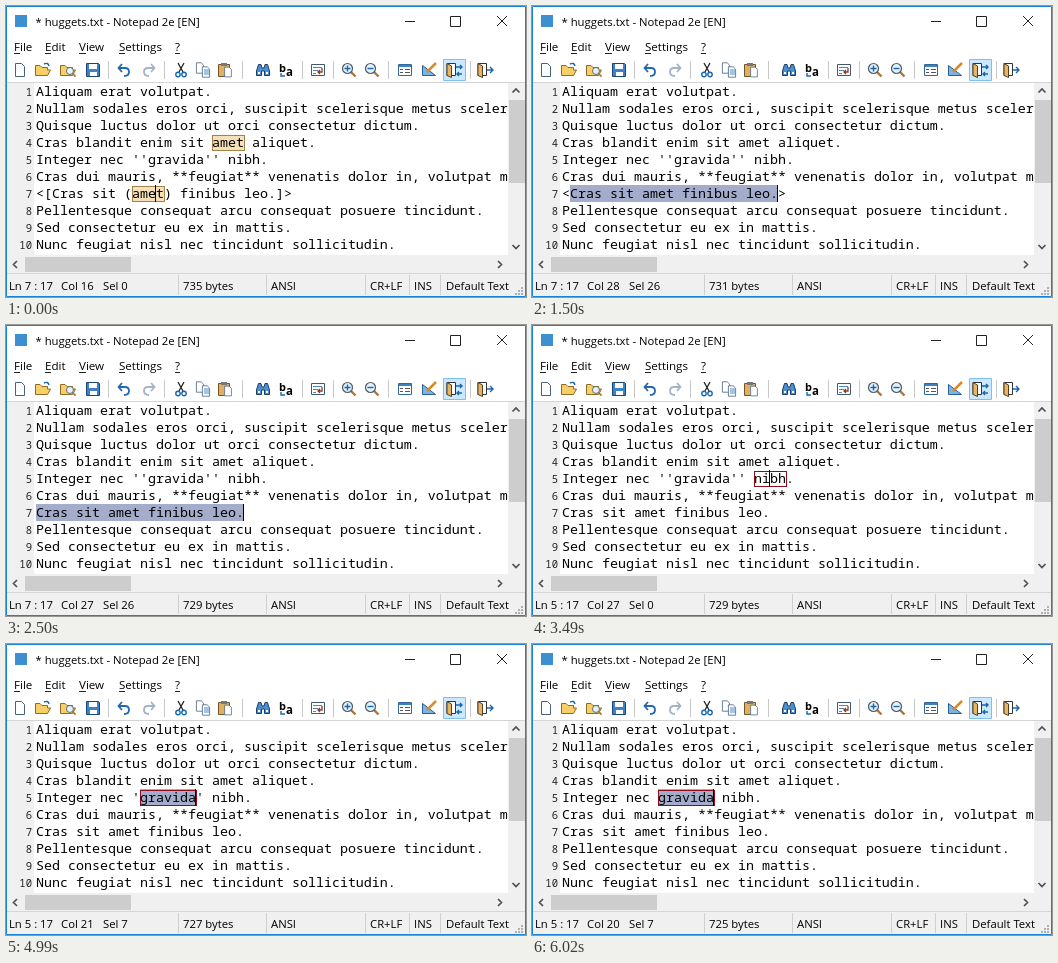
Recreate the animation shown at these times as an HTML page. Size 520 by 291 pixels, loop 8000 ms.

```html
<!DOCTYPE html>
<html lang="en">
<head>
<meta charset="utf-8">
<title>Text editor</title>
<style>
  html, body { margin: 0; width: 100%; height: 100%; overflow: hidden; }
  svg { display: block; width: 520px; height: 291px; }
  text { white-space: pre; }
  .ui { font: 11.6px "Open Sans", sans-serif; fill: #000; }
  .title, .status { font-size: 11.3px; }
  .code { font: 13.33px "Noto Sans Mono", monospace; fill: #000; }
  .num { font: 10.6px "Noto Sans Mono", monospace; fill: #222; text-anchor: end; }
  .line { fill: none; stroke: #222; }
  .blue { fill: none; stroke: #1766b0; stroke-width: 1.4; }
  #keys { font: 600 28px "Open Sans", sans-serif; letter-spacing: 1.6px; text-anchor: middle;
    fill: #63f263; stroke: #176b22; stroke-width: 3px; stroke-linejoin: round; paint-order: stroke; }
</style>
</head>
<body>
<svg viewBox="0 0 520 291">
  <defs>
    <clipPath id="page"><path d="M1 77H502V249H1z"/></clipPath>
    <g id="door">
      <path d="M-7 5.500V-6.500H1.500V5.500z" fill="#fff" stroke="#333"/>
      <path d="M-7-6.500L-2.500-4V7.500L-7 5.500z" fill="#e6b668" stroke="#54401f"/>
    </g>
    <g id="lens">
      <path d="M2 2L6.500 6.500" stroke="#a8773c" stroke-width="2.4"/>
      <circle cx="-1.500" cy="-1.500" r="5" fill="#e4f2fc" stroke="#4d5a66" stroke-width="1.2"/>
    </g>
    <path id="folder" d="M-7.500 5.500V-4.500H-3L-1-2.500H4.500V0H7.500L4.500 5.500z" fill="#f6cf68" stroke="#8f6a24"/>
    <path id="sheet" d="M-4.500-6.500H1.500L4.500-3.500V6.500H-4.500z" fill="#fff" stroke="#47617e"/>
    <g id="bend" fill="none" stroke-width="1.8">
      <path d="M-5-2H1Q5-2 5 2T0 6"/><path d="M-2-6L-5.500-2L-2 2"/>
    </g>
  </defs>

  <!-- window and title bar -->
  <path d="M0 0H520V291H0z" fill="#fff"/>
  <path d="M9 9H21V21H9z" fill="#3d8fd0"/>
  <text class="ui title" x="29.500" y="20">* huggets.txt - Notepad 2e [EN]</text>
  <path class="line" d="M399 15.500H409M444.500 10.500H454.500V20.500H444.500zM491 10L501 20M501 10L491 20"/>
  <g id="menu"></g>

  <!-- toolbar -->
  <path d="M437.500 53.500H459.500V74.500H437.500z" fill="#cce8ff" stroke="#7cc0f2"/>
  <path d="M102.500 55V73M158.500 55V73M236.500 55V73M296.500 55V73M327.500 55V73M382.500 55V73M464.500 55V73" stroke="#c8c8c8"/>
  <use href="#sheet" x="14" y="64"/>
  <g transform="translate(37 64)"><use href="#folder"/><path d="M1-6Q5-8 6-4" class="blue"/></g>
  <g transform="translate(62 64)">
    <use href="#folder"/><use href="#lens" transform="translate(3 2) scale(.7)"/>
  </g>
  <g transform="translate(87 64)">
    <path d="M-6.500-6.500H5.500L6.500-5.500V6.500H-6.500z" fill="#3b82c8" stroke="#1d4573"/>
    <path d="M-4-6H4V-1H-4zM-3 2H4V6H-3z" fill="#fff"/>
  </g>
  <use href="#bend" x="118" y="64" stroke="#2368b0"/>
  <use href="#bend" transform="translate(143 64) scale(-1 1)" stroke="#a3b4c4"/>
  <g transform="translate(175 64)" class="line">
    <path d="M-3-7L2 2M3-7L-2 2" stroke-width="1.3"/>
    <g class="blue"><circle cx="-3" cy="4.500" r="2.200"/><circle cx="3" cy="4.500" r="2.200"/></g>
  </g>
  <g transform="translate(197 64)">
    <use href="#sheet" transform="translate(-3 -2) scale(.8)"/>
    <use href="#sheet" transform="translate(3 2) scale(.8)"/>
    <path d="M1 0H6M1 2H6M1 4H6" stroke="#4a86c5"/>
  </g>
  <g transform="translate(219 64)">
    <path d="M-6.500-5.500H4.500V6.500H-6.500z" fill="#e0b062" stroke="#755326"/>
    <path d="M-4-7H2V-4H-4z" fill="#777"/>
    <use href="#sheet" transform="translate(3 2) scale(.75)"/>
  </g>
  <g transform="translate(257 64)" fill="#4b8fd0" stroke="#1c3d63">
    <path d="M-4.500-5.500H-2L-1-2H1L2-5.500H4.500L6.500 1V5.500H1.500V1H-1.500V5.500H-6.500V1z"/>
    <path d="M-5 2H-3V4H-5zM3 2H5V4H3z" fill="#fff" stroke="none"/>
  </g>
  <g transform="translate(280 64)">
    <text x="-7" y="2" font-family="Open Sans, sans-serif" font-size="11" font-weight="700">b</text>
    <text x="0" y="6" font-family="Open Sans, sans-serif" font-size="11.500" font-weight="700">a</text>
    <path d="M-5 3V6H-1" class="blue"/>
  </g>
  <g transform="translate(312 64)">
    <path d="M-6.500-5.500H6.500V5.500H-6.500z" fill="#fff" stroke="#425a70"/>
    <path d="M-5-2.500H4M-5 .5H0M-5 3.500H-2" stroke="#4a86c5"/>
    <path d="M4-2V2H0M2 0L0 2L2 4" fill="none" stroke="#8a3c20" stroke-width="1.3"/>
  </g>
  <g transform="translate(343 64)"><use href="#lens"/><path d="M-4.500-1.500H1.500M-1.500-4.500V1.500" class="blue"/></g>
  <g transform="translate(366 64)"><use href="#lens"/><path d="M-4.500-1.500H1.500" class="blue"/></g>
  <g transform="translate(399 64)">
    <path d="M-6.500-5.500H6.500V5.500H-6.500z" fill="#fff" stroke="#34679b"/>
    <path d="M-6-5H6V-3H-6z" fill="#3b82c4"/>
    <path d="M-5-.5H-2M0-.5H5M-5 2.500H-2M0 2.500H5" stroke="#555"/>
  </g>
  <g transform="translate(423 64)">
    <path d="M-6.500-4.500V5.500H6.500z" fill="#7db4e6" stroke="#2a5f96"/>
    <path d="M7-7L-2 2" stroke="#d88a24" stroke-width="2.500"/>
  </g>
  <g transform="translate(448 64)">
    <use href="#door"/>
    <path d="M2-3H8M6-5L8-3L6-1M8 4H3M5 2L3 4L5 6" class="blue"/>
  </g>
  <g transform="translate(479 64)">
    <use href="#door"/>
    <path d="M2 0H8M5-3L8 0L5 3" class="blue"/>
  </g>

  <!-- editor -->
  <path d="M1 76.500H519" stroke="#d4d4d4"/>
  <path d="M1 77H28V249H1z" fill="#f0f0f0"/>
  <g clip-path="url(#page)"><g id="marks"></g><g id="lines"></g><path id="caret" stroke="#000"/></g>

  <!-- scroll bars -->
  <path d="M502 77H519V267H502zM1 249H502V267H1z" fill="#f0f0f0"/>
  <path d="M503 94H519V177H503zM19 251H125V266H19z" fill="#cdcdcd"/>
  <path d="M506.500 86.500L510 83L513.500 86.500M506.500 239L510 242.500L513.500 239M11 255L7.500 258.500L11 262M492 255L495.500 258.500L492 262" fill="none" stroke="#505050" stroke-width="1.700"/>

  <!-- status bar -->
  <path d="M1 267H519V290H1z" fill="#f0f0f0"/>
  <path d="M1 267.500H519" stroke="#d5d5d5"/>
  <path d="M172.500 269V289M260.500 269V289M359.500 269V289M403.500 269V289M434.500 269V289" stroke="#d0d0d0"/>
  <path d="M515 281h2v2h-2zM515 284h2v2h-2zM515 287h2v2h-2zM512 284h2v2h-2zM512 287h2v2h-2zM509 287h2v2h-2z" fill="#b0b0b0"/>
  <g id="status"></g>
  <path d="M.5.5H519.500V290.500H.5z" fill="none" stroke="#1883d7"/>
  <text id="keys" x="261" y="281"></text>
</svg>

<script>
const $ = id => document.getElementById(id);
const esc = s => s.replace(/&/g, '&amp;').replace(/</g, '&lt;');
const label = (cls, x, y, s) => `<text class="${cls}" x="${x}" y="${y}">${esc(s)}</text>`;
const colX = col => 22 + 8 * col;
const rowY = row => 60 + 17 * row;

$('menu').innerHTML = [['File', 8, 6], ['Edit', 39, 6], ['View', 73, 7], ['Settings', 113, 6], ['?', 169, 5]]
  .map(([s, x, w]) => label('ui', x, 45, s) + `<path d="M${x} 47.500h${w}" stroke="#222"/>`).join('');

const text = [
  'Aliquam erat volutpat.',
  'Nullam sodales eros orci, suscipit scelerisque metus scelerisque',
  'Quisque luctus dolor ut orci consectetur dictum.',
  'Cras blandit enim sit amet aliquet.',
  '',
  'Cras dui mauris, **feugiat** venenatis dolor in, volutpat mi',
  '',
  'Pellentesque consequat arcu consequat posuere tincidunt.',
  'Sed consectetur eu ex in mattis.',
  'Nunc feugiat nisl nec tincidunt sollicitudin.'
];

// Marks are [row, column, length, fill, border].
const amber = '#a08348', red = '#8c0c1c', blue = '#a3adcb';
const tan = [[4, 23, 4, '#f6e0ba', amber], [7, 13, 4, '#f6e0ba', amber]];
const picked = [[4, 23, 4, '#fbedc6', amber], [7, 12, 4, 'none', '#62656d']];
const nibh = [[5, 25, 4, 'none', red]];
const gravida = col => [[5, col, 7, 'none', red]];

const bare = 'Cras sit amet finibus leo.';
const angled = `<${bare}>`;
const squared = `<[${bare}]>`;
const wrapped = squared.replace('amet', '(amet)');

// Each step lists what changes from the step before it.
const steps = [
  { at: 0, seven: wrapped, quotes: 2, row: 7, col: 16, sel: 0, caret: 1, marks: tan, keys: '', shade: blue },
  { at: 500, caret: 0 },
  { at: 1000, seven: squared, sel: 4, caret: 1, marks: picked, keys: 'Ctrl+Shift+3', shade: '#9299a8' },
  { at: 1500, seven: angled, col: 28, sel: 26, marks: [], keys: '', shade: blue },
  { at: 2000, keys: 'Ctrl+Shift+3' },
  { at: 2500, seven: bare, col: 27, keys: '' },
  { at: 2970, caret: 0 },
  { at: 3490, row: 5, sel: 0, caret: 1, marks: nibh },
  { at: 3970, col: 22 },
  { at: 4470, marks: gravida(15), keys: 'Ctrl+Shift+4' },
  { at: 4990, quotes: 1, col: 21, sel: 7, marks: gravida(14), keys: '' },
  { at: 5470, keys: 'Ctrl+Shift+4' },
  { at: 6020, quotes: 0, col: 20, marks: gravida(13), keys: '' }
];
for (let i = 1; i < steps.length; i++) steps[i] = { ...steps[i - 1], ...steps[i] };

function draw(s) {
  const q = "'".repeat(s.quotes);
  text[4] = `Integer nec ${q}gravida${q} nibh.`;
  text[6] = s.seven;
  $('lines').innerHTML = text.map((t, i) =>
    label('num', 26, rowY(i + 1) + 13, `${i + 1}`) + label('code', 30, rowY(i + 1) + 13, t)).join('');

  const selection = `<rect x="${colX(s.col - s.sel)}" y="${rowY(s.row)}" width="${8 * s.sel}" height="17" fill="${s.shade}"/>`;
  $('marks').innerHTML = selection + s.marks.map(([row, col, len, fill, edge]) =>
    `<rect x="${colX(col) + .5}" y="${rowY(row) + 1.5}" width="${8 * len}" height="15" fill="${fill}" stroke="${edge}"/>`).join('');
  $('caret').setAttribute('d', s.caret ? `M${colX(s.col) - .5} ${rowY(s.row)}v17` : '');

  const bytes = 674 + text[4].length + text[6].length;
  $('status').innerHTML = [
    [3, `Ln ${s.row} : 17`], [55, `Col ${s.col}`], [97, `Sel ${s.sel}`], [177, `${bytes} bytes`],
    [265, 'ANSI'], [364, 'CR+LF'], [408, 'INS'], [440, 'Default Text']
  ].map(([x, t]) => label('ui status', x, 284, t)).join('');
  $('keys').textContent = s.keys;
}

const start = performance.now();
let shown;
function tick() {
  const t = (performance.now() - start) % 8000;
  const step = steps.findLast(s => s.at <= t);
  if (step !== shown) draw(shown = step);
  requestAnimationFrame(tick);
}
tick();
</script>
</body>
</html>
```
